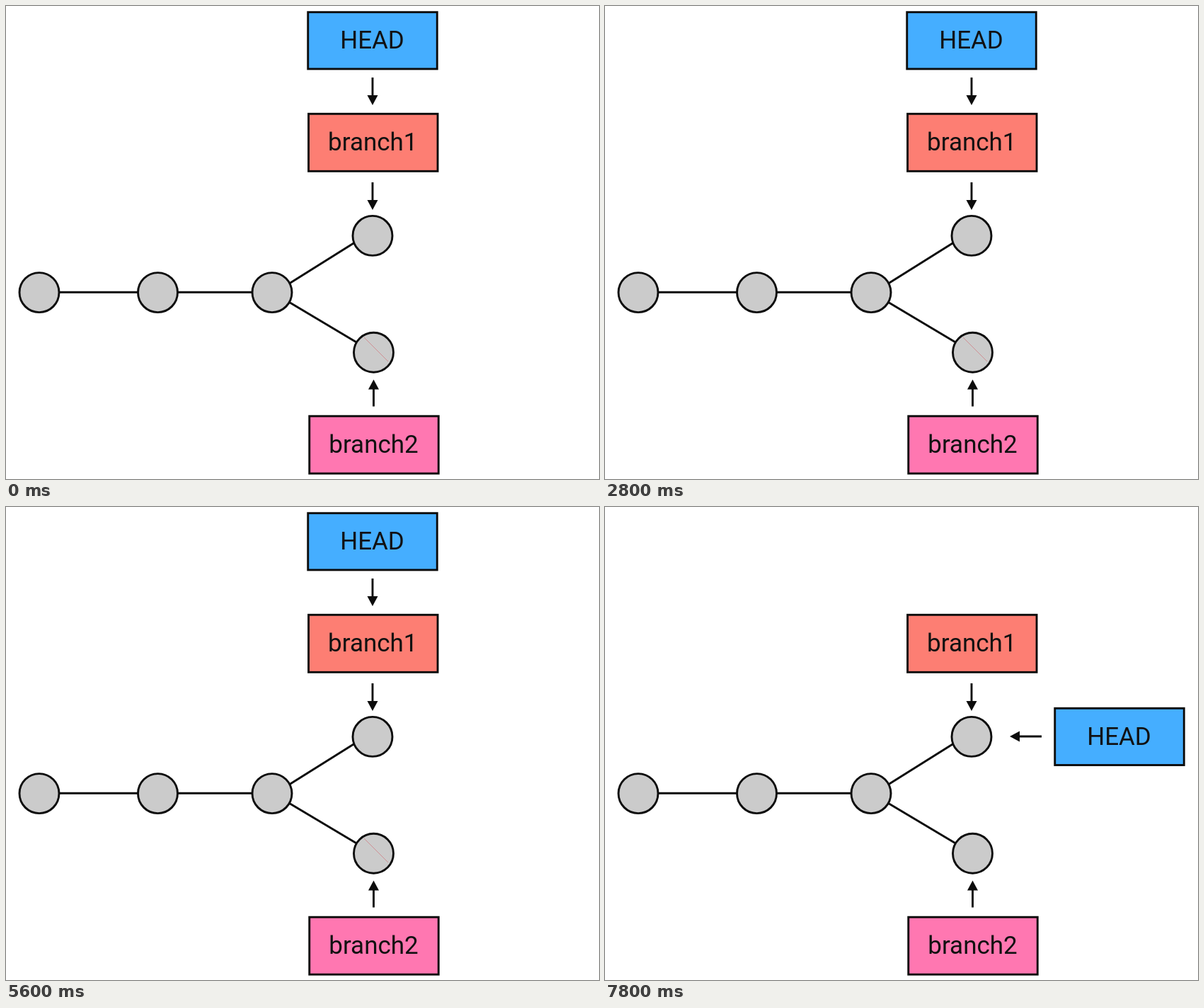
An HTML page with a canvas for the animation above (8000 ms loop, 838x668 px).

```html
<!DOCTYPE html>
<html lang="en">
<head>
<meta charset="utf-8">
<title>Moving HEAD</title>
<style>
  html, body { margin: 0; width: 100%; height: 100%; overflow: hidden; background: #fff; }
  canvas { display: block; }
</style>
</head>
<body>
<canvas id="stage" width="838" height="668"></canvas>
<script>
const ctx = document.getElementById('stage').getContext('2d');
const LOOP = 8000, CYCLE = 2800, STEP = 200;
const MOVE_START = 614, MOVE_TIME = 903;
const INK = '#0c0c0c', WEIGHT = 2.9;

const lerp = (a, b, k) => a + (b - a) * k;

function line(x1, y1, x2, y2, color = INK, width = WEIGHT) {
  ctx.strokeStyle = color;
  ctx.lineWidth = width;
  ctx.beginPath();
  ctx.moveTo(x1, y1);
  ctx.lineTo(x2, y2);
  ctx.stroke();
}

function commit(x, y) {
  ctx.beginPath();
  ctx.arc(x, y, 28, 0, 2 * Math.PI);
  ctx.fillStyle = '#cbcbcb';
  ctx.strokeStyle = INK;
  ctx.lineWidth = WEIGHT;
  ctx.fill();
  ctx.stroke();
}

function label(text, x, y, color, h = 81) {
  const w = 182.5;
  ctx.fillStyle = color;
  ctx.strokeStyle = INK;
  ctx.lineWidth = WEIGHT;
  ctx.fillRect(x - w / 2, y - h / 2, w, h);
  ctx.strokeRect(x - w / 2, y - h / 2, w, h);
  ctx.fillStyle = '#111';
  ctx.fillText(text, x - 0.5, y + 11.5);
}

// Arrow centred on (x, y), pointing along angle (degrees)
function arrow(x, y, angle, length) {
  const tip = length / 2;
  ctx.save();
  ctx.translate(x, y);
  ctx.rotate(angle * Math.PI / 180);
  line(-tip, 0, tip - 8, 0);
  ctx.fillStyle = INK;
  ctx.beginPath();
  ctx.moveTo(tip, 0);
  ctx.lineTo(tip - 14, -7.5);
  ctx.lineTo(tip - 14, 7.5);
  ctx.fill();
  ctx.restore();
}

function draw(time) {
  const phase = Math.floor(time % LOOP / STEP) * STEP % CYCLE;
  const t = Math.min(1, Math.max(0, (phase - MOVE_START) / MOVE_TIME));
  const k = (1 - Math.cos(Math.PI * t)) / 2;

  ctx.fillStyle = '#fff';
  ctx.fillRect(0, 0, 838, 668);
  ctx.font = '35px Roboto, sans-serif';
  ctx.textAlign = 'center';

  line(75, 404.2, 187, 404.2);
  line(243, 404.2, 348, 404.2);
  line(401, 391.5, 492, 334.5);
  line(401, 418.7, 495, 474.7);
  for (const x of [47, 214.5, 376]) commit(x, 404.6);
  commit(518, 324.4);
  commit(519.5, 489.2);
  if (phase < 1600) line(506, 468, 540, 502, '#cf8f94', 1);

  label('branch1', 518.8, 192.8, '#fd7e73');
  label('branch2', 520, 619.7, '#ff77b1');
  arrow(518, 268.5, 90, 39);
  arrow(519.5, 546.5, -90, 38);

  label('HEAD', lerp(518, 727, k), lerp(48.8, 324.4, k), '#45aeff', 80.2);
  arrow(lerp(518, 594.5, k), lerp(120.5, 324, k), lerp(90, 180, k), lerp(39, 45, k));
}

const start = performance.now();
function tick() {
  draw(performance.now() - start);
  requestAnimationFrame(tick);
}
tick();
</script>
</body>
</html>
```
